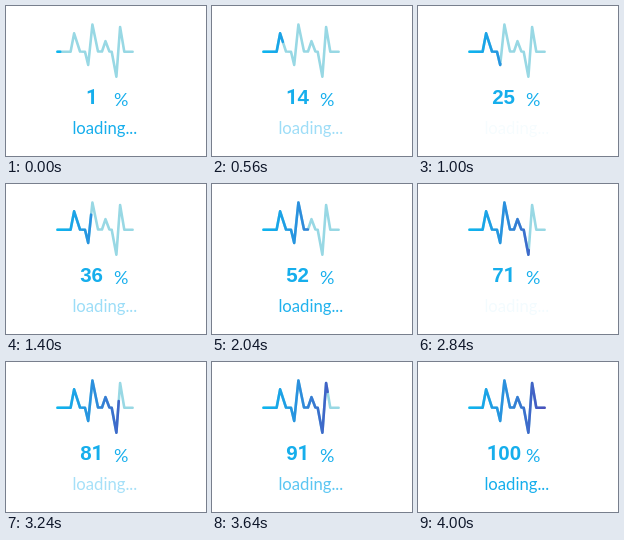
These frames come from a looping animation (200x150 px, 5000 ms). An HTML page with a canvas:

```html
<!DOCTYPE html>
<html lang="en">
<head>
<meta charset="utf-8">
<title>Loading</title>
<style>
html, body { margin: 0; width: 100%; height: 100%; overflow: hidden; background: #fff; }
canvas { display: block; width: 200px; height: 150px; }
</style>
</head>
<body>
<canvas id="stage"></canvas>
<script>
const W = 200, H = 150, LOOP = 5000, STEP = 40, LAST = 100;
const canvas = document.getElementById('stage');
const ctx = canvas.getContext('2d');
const ratio = window.devicePixelRatio || 1;
canvas.width = W * ratio;
canvas.height = H * ratio;
ctx.scale(ratio, ratio);

const BLUE = '#16aeec', PALE = '#98d8e4';
const pulse = [
  [51.5, 45.8], [64.6, 45.8], [68.1, 27.4], [74, 45.5], [79, 45.8], [82.2, 58.9],
  [86.4, 18.6], [92, 45.5], [96, 45.5], [99.5, 35.2], [103.4, 45.5],
  [105.7, 45.8], [110.4, 70.7], [114.1, 21], [118.3, 45.8], [126.6, 45.8]
];
const gap = (a, b) => Math.hypot(b[0] - a[0], b[1] - a[1]);
const total = pulse.slice(1).reduce((sum, p, k) => sum + gap(pulse[k], p), 0);

const shade = ctx.createLinearGradient(51, 0, 128, 0);
shade.addColorStop(0, '#0cb6f0');
shade.addColorStop(0.5, '#2e8cdc');
shade.addColorStop(1, '#4c4cba');

function trace(length, color) {
  ctx.strokeStyle = color;
  ctx.lineWidth = 2.6;
  ctx.lineCap = ctx.lineJoin = 'round';
  ctx.beginPath();
  ctx.moveTo(...pulse[0]);
  for (let k = 1; k < pulse.length && length > 0; k++) {
    const a = pulse[k - 1], b = pulse[k], d = gap(a, b);
    const part = Math.min(1, length / d);
    ctx.lineTo(a[0] + (b[0] - a[0]) * part, a[1] + (b[1] - a[1]) * part);
    length -= d;
  }
  ctx.stroke();
}

function label(text, x, y, font, align = 'center') {
  ctx.font = font;
  ctx.textAlign = align;
  ctx.fillText(text, x, y);
}

// The digit 1 uses a face without a foot.
function counter(value) {
  const text = String(value);
  const face = 'bold 20.5px "Liberation Sans", Arial, sans-serif';
  const plain = 'bold 20.5px Roboto, sans-serif';
  ctx.font = face;
  const cell = ctx.measureText('0').width;
  const middle = text.length === 2 ? 85.6 : 86;
  [...text].forEach((c, k) => {
    const x = middle + (k - (text.length - 1) / 2) * cell;
    label(c, x, 98.2, c === '1' ? plain : face);
  });
}

// Linear fades between full and clear
function fade(i) {
  const keys = [[0, 1], [24, 0], [50, 1], [70, 0.02], [LAST, 1]];
  const k = Math.max(1, keys.findIndex(key => key[0] >= i));
  const [i0, v0] = keys[k - 1], [i1, v1] = keys[k];
  return v0 + (v1 - v0) * (i - i0) / (i1 - i0);
}

function draw(time) {
  const i = Math.min(LAST, Math.floor((time % LOOP) / STEP));
  ctx.fillStyle = '#fff';
  ctx.fillRect(0, 0, W, H);

  trace(total, PALE);
  trace(total * (i + 1) / (LAST + 1), shade);

  ctx.fillStyle = BLUE;
  counter(Math.max(1, Math.round(i + 0.6 * Math.sin(Math.PI * i / LAST))));
  label('%', 115.3, 100, '18px Lato, sans-serif');

  ctx.globalAlpha = fade(i);
  label('loading...', 66.4, 127.5, '16.7px Lato, sans-serif', 'left');
  ctx.globalAlpha = 1;
}

function tick() {
  draw(performance.now());
  requestAnimationFrame(tick);
}
tick();
</script>
</body>
</html>
```
